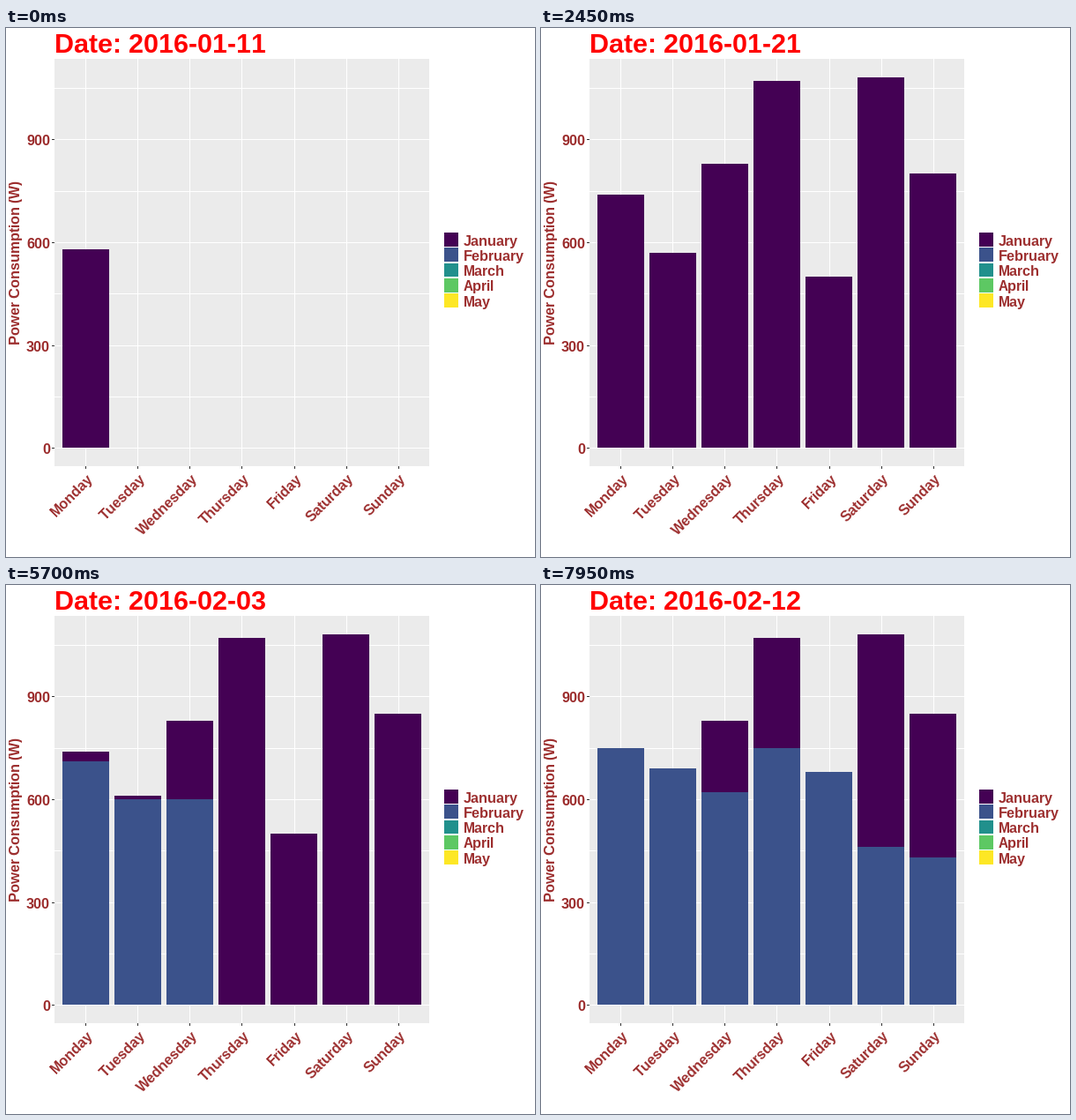
A matplotlib script for the animation above (8000 ms loop, 600 px wide and 600 px high).

```python
import matplotlib.pyplot as plt
from matplotlib.animation import FuncAnimation
from matplotlib.patches import Rectangle

plt.rcParams.update({
    "font.family": "Liberation Sans",
    "font.weight": "bold",
    "text.hinting": "native",
    "text.hinting_factor": 1,
    "text.kerning_factor": 6,
})

SIZE, DPI = 600, 100
LEFT, TOP, RIGHT, BOTTOM = 55, 35, 480, 497
STEP = 59.026
ZERO, SCALE = 476.34, 0.3888
INK = "#9c2d2d"
DAYS = ["Monday", "Tuesday", "Wednesday", "Thursday",
        "Friday", "Saturday", "Sunday"]
MONTHS = {"January": "#440154", "February": "#3B528B", "March": "#21908C",
          "April": "#5DC863", "May": "#FDE725"}

# Daily peaks from Monday 11 January on; 0 where no new peak shows
POWER = [580, 500, 520, 910, 500, 1080, 800,
         740, 570, 830, 1070, 0, 0, 850,
         0, 610, 0, 0, 0, 0, 0,
         710, 600, 600, 600, 540, 460, 430,
         750, 690, 620, 750, 680]
JAN_DAYS = 21

fig = plt.figure(figsize=(SIZE / DPI, SIZE / DPI), dpi=DPI, facecolor="white")
ax = fig.add_axes([0, 0, 1, 1])
ax.set_xlim(0, SIZE)
ax.set_ylim(SIZE, 0)
ax.axis("off")


def box(x0, y0, x1, y1, color, z=1):
    patch = Rectangle((x0, y0), x1 - x0, y1 - y0, fc=color, lw=0,
                      antialiased=False, zorder=z)
    return ax.add_patch(patch)


def label(x, y, text, px=16, color=INK, **kw):
    kw.setdefault("va", "baseline")
    return ax.text(x, y, text, fontsize=px * 0.72, color=color, **kw)


def x_at(i):
    return LEFT + (i + 0.6) * STEP


def y_at(value):
    return round(ZERO - value * SCALE)


# Panel, grid and axes
box(LEFT, TOP, RIGHT, BOTTOM, "#EBEBEB")
for value in range(0, 1051, 150):
    y = y_at(value)
    box(LEFT, y, RIGHT, y + 1, "white", 2)
    if value % 300 == 0:
        box(LEFT - 3, y, LEFT, y + 1, "#333333")
        label(50, y + 7, str(value), ha="right")
for i, day in enumerate(DAYS):
    x = round(x_at(i))
    box(x, TOP, x + 1, BOTTOM, "white", 2)
    box(x, BOTTOM, x + 1, BOTTOM + 3, "#333333")
    label(x_at(i) + 10, 512, day, ha="right", rotation=45,
          rotation_mode="anchor")
label(16, 266, "Power Consumption (W)", ha="center", rotation=90,
      rotation_mode="anchor")

# Legend
for i, (month, color) in enumerate(MONTHS.items()):
    mid = 240 + 17.28 * i
    box(497, round(mid - 8), 513, round(mid + 7.9), color, 2)
    label(519, round(mid + 6.6), month)

title = label(55, 28, "", 30, "red")


def month_bars(color, z):
    bars = []
    for i in range(7):
        x0, x1 = (round(x_at(i) + d * STEP) for d in (-0.45, 0.45))
        bars.append(box(x0, ZERO, x1, ZERO, color, z))
    return bars


jan = month_bars(MONTHS["January"], 3)
feb = month_bars(MONTHS["February"], 4)


def set_peaks(bars, values):
    base = y_at(0)
    for i, bar in enumerate(bars):
        top = y_at(max(values[i::7], default=0))
        bar.set_y(top)
        bar.set_height(base - top)
        bar.set_visible(top < base)


def update(frame):
    n = (frame + 1) // 5
    day = 11 + n
    month, day = (1, day) if day <= 31 else (2, day - 31)
    title.set_text(f"Date: 2016-{month:02d}-{day:02d}")
    seen = POWER[:n + 1]
    set_peaks(jan, seen[:JAN_DAYS])
    set_peaks(feb, seen[JAN_DAYS:])
    return [title, *jan, *feb]


anim = FuncAnimation(fig, update, frames=160, interval=50, repeat=True,
                     repeat_delay=0, blit=False)
plt.show()
```
